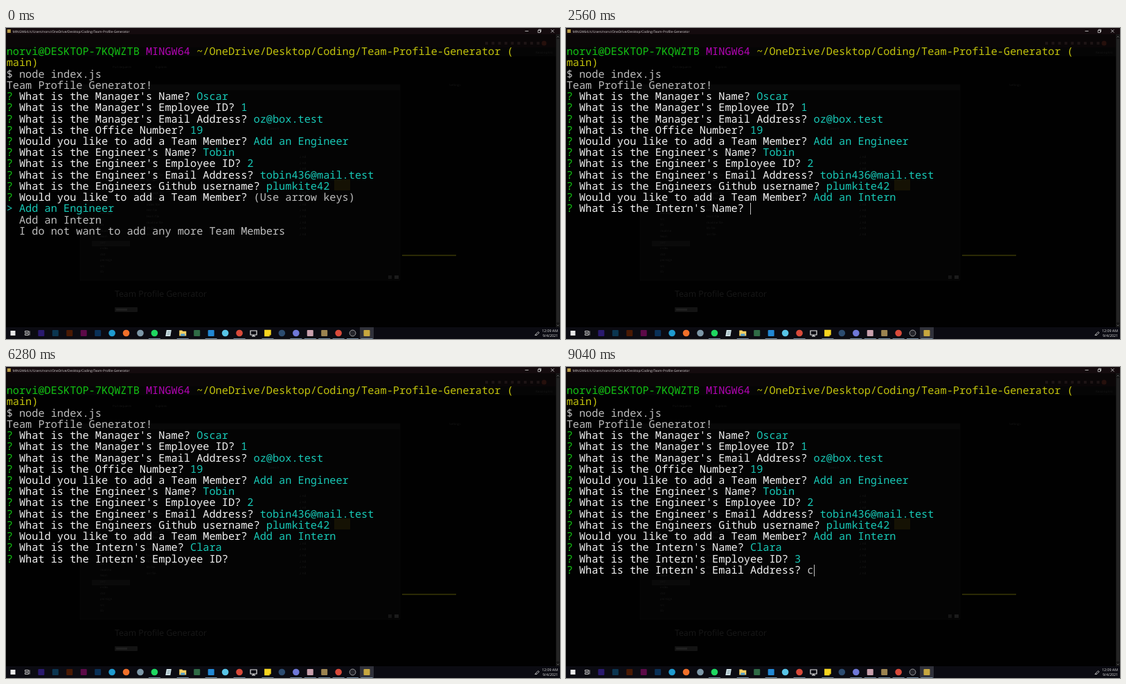
These frames come from a looping animation (800x450 px, 9240 ms). An HTML page:

```html
<!DOCTYPE html>
<html lang="en">
<head>
<meta charset="utf-8">
<title>Team Profile Generator</title>
<style>
html, body { margin: 0; width: 100%; height: 100%; overflow: hidden; background: #000; }
svg { display: block; width: 100vw; height: 100vh; }
text { white-space: pre; text-rendering: geometricPrecision; }
.term text { font: 15.25px "Noto Sans Mono", "DejaVu Sans Mono", monospace; }
.ui text { font-family: "Open Sans", "Noto Sans", sans-serif; }
</style>
</head>
<body>
<svg viewBox="0 0 800 450" xmlns="http://www.w3.org/2000/svg">
  <rect width="800" height="450" fill="#010101"/>

  <!-- windows showing faintly through the terminal -->
  <g class="ui">
    <rect y="9" width="794" height="19" fill="#0a0607"/>
    <rect y="28" width="794" height="13" fill="#050505"/>
    <rect x="107" y="82" width="462" height="283" fill="#040404" stroke="#0b0b0b" stroke-width=".7"/>
    <rect x="107" y="82" width="462" height="8" fill="#080808"/>
    <rect x="124" y="308" width="55" height="8" fill="#0a0a0a"/>
    <rect x="474" y="219" width="23" height="16" fill="#151204"/>
    <rect x="572" y="328" width="78" height="2" fill="#2b2a05"/>
    <rect x="552" y="358" width="5" height="5" fill="#161616"/>
    <rect x="561" y="358" width="6" height="5" fill="#1c1c1c"/>
    <circle cx="777" cy="22" r="3.5" fill="#26100c"/>
    <g id="ghost" font-size="4.5" fill="#171717"></g>
    <text x="157" y="389" font-size="12.3" fill="#181818">Team Profile Generator</text>
    <rect x="157" y="404" width="33" height="7" rx="1" fill="#131313"/>
    <rect x="159" y="406" width="16" height="3" fill="#202020"/>
  </g>

  <!-- title bar -->
  <g class="ui">
    <rect width="800" height="9" fill="#140b0e"/>
    <rect x="1.8" y="2" width="5" height="5" fill="#b59a45"/>
    <text x="9.5" y="6.6" font-size="4.75" fill="#d4d0d1">MINGW64:/c/Users/norvi/OneDrive/Desktop/Coding/Team-Profile-Generator</text>
    <g fill="none" stroke="#d8d8d8" stroke-width=".8">
      <path d="M749.5 4.5h5M787 2.2l4.4 4.4M791.4 2.2l-4.4 4.4"/>
      <path d="M768.2 3.4h3.3v3.3h-3.3zM769.2 3.2v-1h3.3v3.4h-1"/>
    </g>
  </g>

  <!-- scroll bar -->
  <rect x="794" y="9" width="6" height="424" fill="#171717"/>
  <rect x="795" y="16" width="4" height="410" fill="#242424"/>
  <path d="M795.5 13.5l1.5-1.5 1.5 1.5M795.5 429.5l1.5 1.5 1.5-1.5" fill="none" stroke="#808080" stroke-width=".7"/>

  <!-- task bar -->
  <g class="ui">
    <rect y="433" width="800" height="17" fill="#0b0b12"/>
    <g id="icons"></g>
    <path d="M764.5 443.5l4-4 1.5 1.5-4 3.5zM763.5 444.5h3" fill="none" stroke="#d0d0d0" stroke-width=".8"/>
    <g font-size="5.3" fill="#dcdcdc" text-anchor="end">
      <text x="797" y="439.6">12:09 AM</text>
      <text x="797" y="447.4">9/4/2021</text>
    </g>
  </g>

  <g class="term">
    <g id="fixed"></g>
    <g id="live"></g>
    <rect id="caret" width="1" height="17" fill="#bfbfbf"/>
  </g>
</svg>

<script>
const LOOP = 9240, ADV = 9.15, LEFT = 0.65, TOP = 26.2, PITCH = 16.22;
const GREEN = '#13c413', MAGENTA = '#b404b4', YELLOW = '#c4c40c';
const GREY = '#bfbfbf', WHITE = '#f4f4f4', CYAN = '#18cab8';
const $ = id => document.getElementById(id);

const line = (row, ...parts) =>
  `<text x="${LEFT}" y="${(TOP + row * PITCH + 13).toFixed(2)}">` +
  parts.map(([color, s]) => `<tspan fill="${color}">${s}</tspan>`).join('') + '</text>';
const ask = (row, question, answer = '', color = CYAN) =>
  line(row, [GREEN, '? '], [WHITE, question + ' '], [color, answer]);

const ADD = 'Would you like to add a Team Member?';
const CHOICES = ['Add an Engineer', 'Add an Intern', 'I do not want to add any more Team Members'];
const asked = [
  ["What is the Manager's Name?", 'Oscar'],
  ["What is the Manager's Employee ID?", '1'],
  ["What is the Manager's Email Address?", 'oz@box.test'],
  ['What is the Office Number?', '19'],
  [ADD, CHOICES[0]],
  ["What is the Engineer's Name?", 'Tobin'],
  ["What is the Engineer's Employee ID?", '2'],
  ["What is the Engineer's Email Address?", 'tobin436@mail.test'],
  ['What is the Engineers Github username?', 'plumkite42']
];

// open: prompt appears, keys: one time per typed letter
const prompts = [
  { open: 1440, q: "What is the Intern's Name?", a: 'Clara', keys: [3760, 4240, 4400, 4560, 4720] },
  { open: 5280, q: "What is the Intern's Employee ID?", a: '3', keys: [7560] },
  { open: 7840, q: "What is the Intern's Email Address?", a: 'c', keys: [9040] }
];
const ARROW = 1080, ENTER = prompts[0].open;
const caretOff = [[1960, 2480], [3040, 3560], [5800, 6360], [6880, 7420], [8360, 8920]];

$('fixed').innerHTML =
  line(0, [GREEN, 'norvi@DESKTOP-7KQWZTB '], [MAGENTA, 'MINGW64 '],
    [YELLOW, '~/OneDrive/Desktop/Coding/Team-Profile-Generator (']) +
  line(1, [YELLOW, 'main)']) +
  line(2, [GREY, '$ node index.js']) +
  line(3, [GREY, 'Team Profile Generator!']) +
  asked.map(([q, a], i) => ask(4 + i, q, a)).join('');

function menu(pick) {
  return ask(13, ADD, pick ? '' : '(Use arrow keys)', GREY) +
    CHOICES.map((c, i) => line(14 + i, i === pick ? [CYAN, '> ' + c] : [GREY, '  ' + c])).join('');
}

function drawGhost() {
  const words = ['index', 'src', 'team', 'dist', 'lib', 'test', 'package', 'readme'];
  const put = (x, y, s) => `<text x="${x}" y="${y}">${s}</text>`;
  let out = put(154, 58, 'Pull requests') + put(216, 58, 'Explore') + put(640, 84, 'Settings') +
    put(380, 147, 'Search') + put(765, 37, 'Reading list');
  for (let i = 0; i < 21; i++) out += put(136, 184 + i * 8.5, words[i * 3 % 8]);
  for (let i = 0; i < 14; i++)
    out += put(203, 188 + i * 8.6, words[i * 5 % 8] + ' file') + put(424, 188 + i * 8.6, '2 KB');
  for (let i = 0; i < 9; i++) out += `<rect x="${692 + i * 9.3}" y="20" width="4" height="4" fill="#1d1415"/>`;
  $('ghost').innerHTML = out;
}

function drawIcons() {
  const sq = c => `<rect x="-4.5" y="-4.5" width="9" height="9" rx="1" fill="${c}"/>`;
  const dot = c => `<circle r="4.8" fill="${c}"/>`;
  const list = [
    '<rect x="-3.5" y="-3.5" width="7" height="7" fill="#e8e8e8"/>',
    '<path d="M-3-3h5v2.2h-5zM-3 .8h5V3h-5zM3.6-3v6" fill="none" stroke="#cfcfcf" stroke-width=".9"/>',
    sq('#2a1a6e'), sq('#0b3550'), sq('#4a1a04'), sq('#5c0a48'), sq('#0a3158'),
    dot('#1f9bd0'), dot('#f0702a'), dot('#7d98a8'), dot('#1ed760'),
    '<path d="M-3-4.5h7L2.500 4.500h-7z" fill="#cfe2e6"/><path d="M-1.500-2h4M-2 0h4M-2.500 2h4" stroke="#6d8a94" stroke-width=".7"/>',
    '<path d="M-5-4h4l1 1.200h5V4H-5z" fill="#f3cf63"/><path d="M-3 1h6v3h-6z" fill="#4b9fd6"/>',
    sq('#2f6b45'), sq('#2188d4'), dot('#58c4e6'), dot('#d94a3a'),
    '<path d="M-4.500-3.500h9v6h-9zM-2.500 4.300h5M0 2.500v2" fill="none" stroke="#e4e4e4" stroke-width="1.200"/>',
    '<path d="M-4.800-4.800h9.600v7l-2.600 2.600h-7z" fill="#f6d51f"/><path d="M4.800 2.200h-2.600v2.600z" fill="#a88b08"/>',
    dot('#2c4c70'), dot('#6f78d8'), sq('#c9a0ad'), sq('#9b8350'),
    dot('#d94a3a'), '<circle r="4.400" fill="#25252b" stroke="#b8b8b8" stroke-width=".8"/>', sq('#c7a73f')
  ];
  const running = [10, 12, 14, 16, 18, 20, 21, 22, 23, 24, 25];
  $('icons').innerHTML = list.map((shape, i) => {
    const x = 10 + i * 20.44;
    return `<g transform="translate(${x.toFixed(2)} 441.500)">` +
      (i === 25 ? '<rect x="-10" y="-8.500" width="20" height="17" fill="#30313a"/>' : '') + shape +
      (running.includes(i) ? '<rect x="-8.500" y="7.500" width="17" height="1" fill="#718aa0"/>' : '') + '</g>';
  }).join('');
}

let shown = '';
function render(t) {
  let html, col = -1, row = 0;
  if (t < ENTER) {
    html = menu(t < ARROW ? 0 : 1);
  } else {
    html = ask(13, ADD, CHOICES[1]);
    const open = prompts.filter(p => t >= p.open);
    open.forEach((p, i) => {
      const last = i === open.length - 1;
      const typed = p.a.slice(0, p.keys.filter(k => t >= k).length);
      html += ask(14 + i, p.q, typed, last ? GREY : CYAN);
      col = 3 + p.q.length + typed.length;
      row = 14 + i;
    });
  }
  if (html !== shown) $('live').innerHTML = shown = html;
  const on = col >= 0 && !caretOff.some(([a, b]) => t >= a && t < b);
  const caret = $('caret');
  caret.setAttribute('visibility', on ? 'visible' : 'hidden');
  caret.setAttribute('x', Math.round(LEFT + col * ADV));
  caret.setAttribute('y', Math.round(TOP + row * PITCH));
}

drawGhost();
drawIcons();
const start = performance.now();
function tick() {
  render((performance.now() - start) % LOOP);
  requestAnimationFrame(tick);
}
tick();
</script>
</body>
</html>
```
